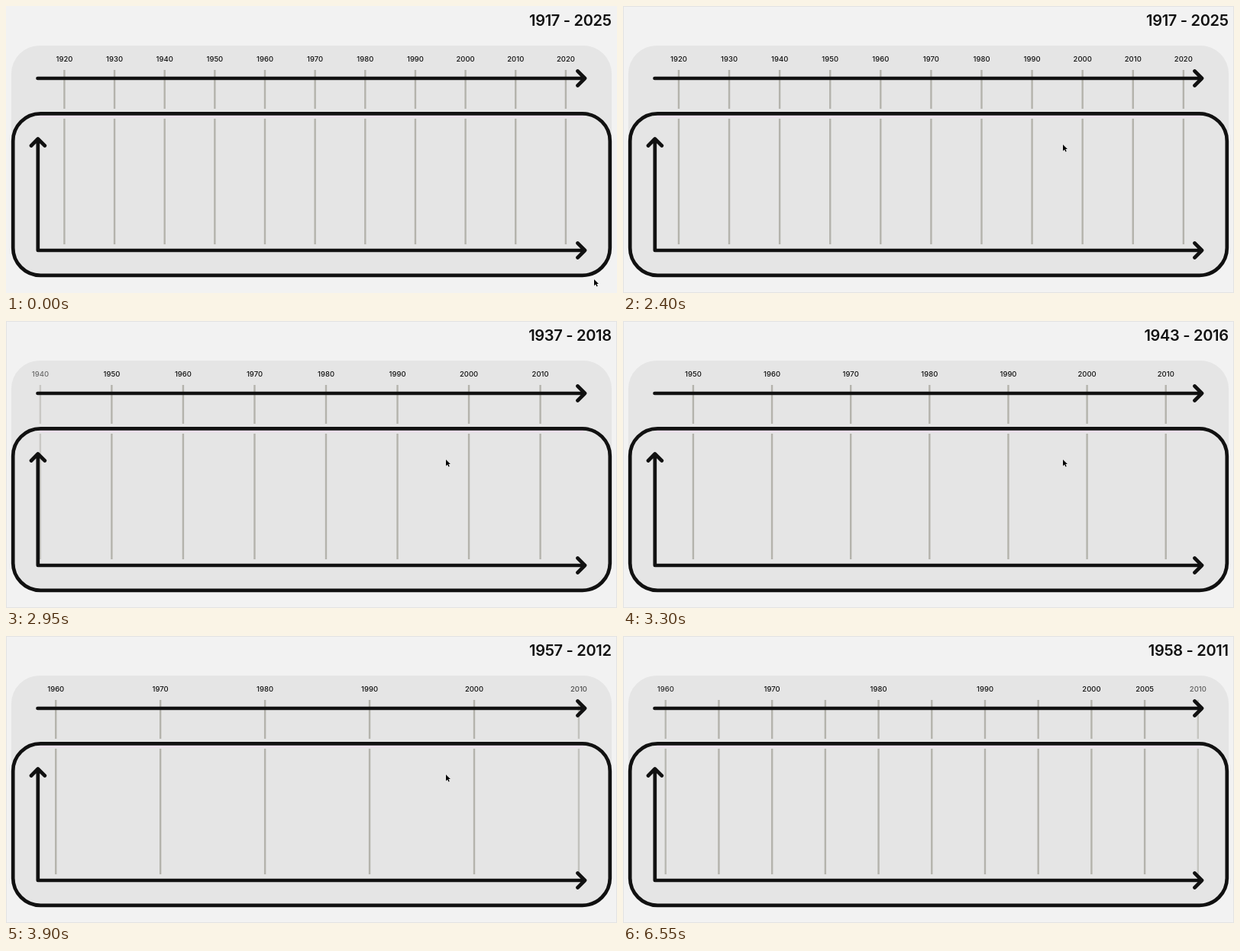
These frames come from a looping animation (800x377 px, 8 s). An HTML page:

```html
<!DOCTYPE html>
<html lang="en">
<head>
<meta charset="utf-8">
<title>Timeline zoom</title>
<style>
html, body { margin: 0; width: 100%; height: 100%; overflow: hidden; background: #f2f2f2; }
svg { display: block; width: 800px; height: 377px; }
text { font-family: Inter, "Open Sans", sans-serif; fill: #111; }
#range { font-size: 20px; font-weight: 600; letter-spacing: -.3px; text-anchor: end; }
#ticks text { font-size: 9.5px; font-weight: 500; text-anchor: middle; }
#ticks path { stroke: #b4b3ac; stroke-width: 2.4; }
.ink { fill: none; stroke: #111; stroke-width: 4.7; stroke-linecap: round; stroke-linejoin: round; }
</style>
</head>
<body>
<svg viewBox="0 0 800 377">
  <rect id="edge" x=".5" y=".5" width="799" height="376" fill="none" stroke="#e3e3e3"/>
  <rect x="7" y="52" width="786" height="304" rx="37" fill="#e5e5e5"/>
  <path d="M44 145H756" stroke="#ebdfeb" stroke-width="3"/>
  <g id="ticks"></g>
  <rect class="ink" x="9.2" y="141.4" width="781.6" height="212.4" rx="36"/>
  <path class="ink" d="M41.5 95H758M748.5 85.5L758 95L748.5 104.5
    M33 183.5L41.8 174.5L50.8 183.5M41.8 174.5V321H758M748.5 311.5L758 321L748.5 330.5"/>
  <text id="range" x="792.7" y="26"></text>
  <path id="cursor" d="M0 0V8.4L2 6.6L3.4 9.6L4.8 9L3.4 6.1H6Z" fill="#000" stroke="#fff" stroke-width=".8" paint-order="stroke"/>
</svg>
<script>
const LOOP = 8000;
const PIVOT_X = 591.1, PIVOT_YEAR = 1998.4, BASE_SCALE = 6.565;

// Log zoom: [time, value, slope]
const ZOOM = [
  [2350, 0, 0], [2650, .152, .0007], [3225, .44, 0],
  [3300, .4514, .0003], [3900, .735, .00025], [4050, .7531, 0]
];
// Pointer moves: [start, end, fromX, fromY, toX, toY]
const MOVES = [
  [0, 150, 770, 359, 760, 195],
  [1400, 1800, 760, 195, 576, 182],
  [6300, 6550, 576, 182, 808, 255]
];

const byId = id => document.getElementById(id);
const clamp = v => Math.min(1, Math.max(0, v));
const ramp = (t, a, b) => clamp((t - a) / (b - a));
const smooth = p => p * p * (3 - 2 * p);

function logZoom(t) {
  if (t <= ZOOM[0][0]) return 0;
  const i = ZOOM.findIndex(k => k[0] > t);
  if (i < 0) return ZOOM[ZOOM.length - 1][1];
  const [t0, v0, m0] = ZOOM[i - 1], [t1, v1, m1] = ZOOM[i];
  const d = t1 - t0, p = (t - t0) / d, q = 1 - p;
  return v0 + (v1 - v0) * smooth(p) + d * p * q * (m0 * q - m1 * p);
}

function makeTick(year) {
  const g = document.createElementNS("http://www.w3.org/2000/svg", "g");
  const label = year % 10 === 0 || year === 2005;
  g.innerHTML = '<path d="M0 84V135M0 148V313"/>' + (label ? `<text y="73">${year}</text>` : "");
  byId("ticks").append(g);
  return { year, g };
}
const ticks = Array.from({ length: 25 }, (_, i) => makeTick(1910 + i * 5));

function draw(t) {
  const scale = BASE_SCALE * Math.exp(logZoom(t));
  const yearAt = x => PIVOT_YEAR + (x - PIVOT_X) / scale;
  const minor = ramp(t, 4050, 4750);

  for (const { year, g } of ticks) {
    const x = PIVOT_X + (year - PIVOT_YEAR) * scale;
    const fade = clamp(Math.min(x - 25, 775 - x) / 35);
    g.setAttribute("transform", `translate(${x})`);
    g.setAttribute("opacity", fade * (year % 10 ? minor : 1));
  }

  const first = Math.max(1917, Math.ceil(yearAt(14.4)));
  const last = Math.min(2025, Math.floor(yearAt(780)));
  byId("range").textContent = `${first} - ${last}`;
  byId("edge").setAttribute("opacity", t < 2400 ? 0 : 1);

  const [a, b, x0, y0, x1, y1] = MOVES.filter(m => m[0] <= t).pop();
  const p = smooth(ramp(t, a, b));
  byId("cursor").setAttribute("transform", `translate(${x0 + (x1 - x0) * p} ${y0 + (y1 - y0) * p})`);
}

const start = performance.now();
function tick() {
  draw((performance.now() - start) % LOOP);
  requestAnimationFrame(tick);
}
tick();
</script>
</body>
</html>
```
